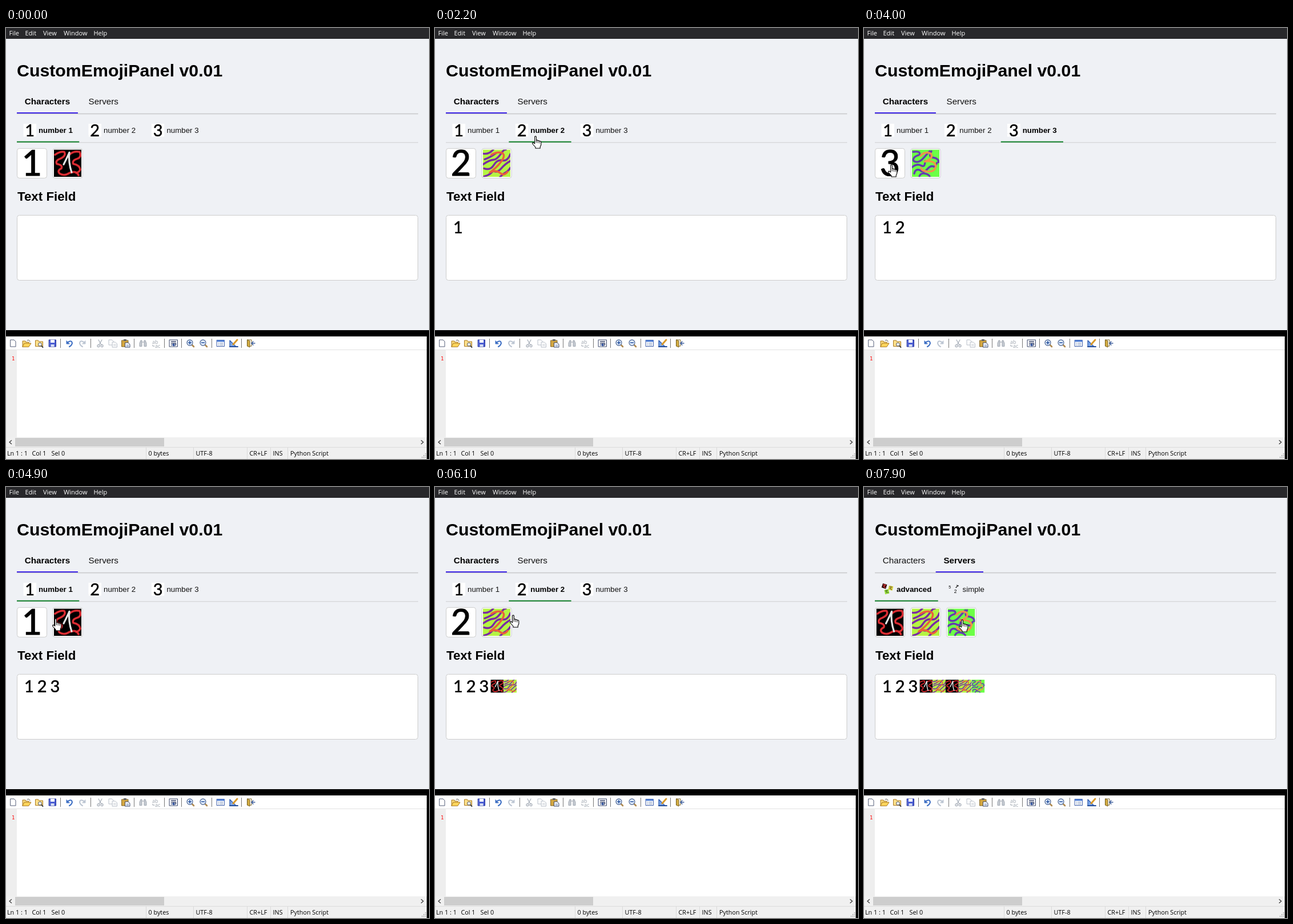
An HTML page for the animation above (8 s loop, 741x756 px).

```html
<!DOCTYPE html>
<html lang="en">
<head>
<meta charset="utf-8">
<title>Emoji panel</title>
<style>
html, body { margin: 0; width: 100%; height: 100%; overflow: hidden; background: #000; }
svg { display: block; width: 741px; height: 756px; }
text { white-space: pre; }
.page { font-family: "Liberation Sans", Arial, sans-serif; }
.ui { font-family: "Open Sans", "Noto Sans", sans-serif; }
.digit { font: 61px Lato, sans-serif; text-anchor: middle; stroke: #000; stroke-width: 1.1; }
.line { fill: none; stroke-linecap: round; stroke-linejoin: round; }
</style>
</head>
<body>
<svg id="stage" viewBox="0 0 741 756" xmlns="http://www.w3.org/2000/svg"></svg>
<script>
const LOOP = 8000, STEP = 100, LEFT = 19, SLOT = 22.8, GAP = 4.8;
const stage = document.getElementById('stage');
const measureCtx = document.createElement('canvas').getContext('2d');

const rect = (x, y, w, h, fill, more = '') =>
  `<rect x="${x}" y="${y}" width="${w}" height="${h}" fill="${fill}" ${more}/>`;
const text = (x, y, size, str, more = '') =>
  `<text x="${x}" y="${y}" font-size="${size}" ${more}>${str}</text>`;
const path = (d, stroke, width = 1, fill = 'none') =>
  `<path d="${d}" class="line" style="fill:${fill}" stroke="${stroke}" stroke-width="${width}"/>`;
const tile = (id, x, y, size) =>
  `<use href="#${id}" transform="translate(${x} ${y}) scale(${size / 48})"/>`;
const textWidth = (str, size, bold) => {
  measureCtx.font = `${bold ? 'bold ' : ''}${size}px "Liberation Sans", Arial, sans-serif`;
  return measureCtx.measureText(str).width;
};

// Emoji artwork, each on a 48 unit square
const symbol = (id, body) =>
  `<symbol id="${id}" width="48" height="48" viewBox="0 0 48 48">${body}</symbol>`;
const digit = n =>
  symbol('d' + n, rect(0, 0, 48, 48, '#fff') + `<text class="digit" x="24" y="46">${n}</text>`);

const redLoops = 'M2 9Q10 3 18 4Q22 11 11 16Q2 19 5 25Q16 27 13 33Q5 37 10 42Q18 47 27 41Q40 36 43 45' +
  'M28 8Q35 2 45 4Q49 13 41 16Q31 19 34 25Q45 27 46 35Q45 39 39 41';
const purpleWaves = 'M0 7Q10 9 18 0M0 26Q12 18 18 18T31 8T40 0M2 33Q13 37 19 27T34 19T48 8' +
  'M2 47Q12 45 18 37Q24 42 32 33T48 20M30 48Q36 42 40 40T48 32M3 17Q12 14 23 6';
const purpleLoops = 'M2 4Q16 2 13 9Q0 13 3 20Q11 25 20 15T31 3M34 3Q28 13 37 14T47 22' +
  'M0 31Q9 24 16 28T23 20M4 42Q6 33 14 36Q20 42 27 34T40 31L44 23M13 47Q15 41 22 42T31 47';
const artwork =
  symbol('e1', rect(0, 0, 48, 48, '#000') + path(redLoops, '#b61f25', 3.8) +
    path(redLoops, '#e8343a', 1.6) + path('M17 26Q23 14 27 5Q25 22 31 40', '#e4e4e4', 3.2)) +
  symbol('e2', rect(0, 0, 48, 48, '#b5f443') + path(purpleWaves, '#7a2aa5', 3.4) +
    path('M15 9Q25 3 34 6Q40 10 32 21T12 40Q23 35 30 41T43 39', '#ea5f3a', 3.4)) +
  symbol('e3', rect(0, 0, 48, 48, '#6cff46') + path(purpleLoops, '#653bb0', 3.4) +
    path('M15 11Q23 2 33 7Q39 15 22 21Q40 18 42 29Q39 41 25 38Q17 37 16 32', '#f0924a', 3.4)) +
  symbol('advanced',
    `<g transform="translate(3 4) rotate(18 8 8) scale(.34)">${tileBody('#2a0808', '#c33')}</g>` +
    `<g transform="translate(29 10) rotate(14) scale(.33)">${tileBody('#d6d640', '#8b7530')}</g>` +
    `<g transform="translate(11 27) rotate(-12) scale(.33)">${tileBody('#9be03c', '#59862b')}</g>`) +
  symbol('simple', `<g class="page">${text(5, 22, 15, '5')}${text(25, 38, 18, '2')}</g>` +
    path('M32 18L40 10M35 9L41 12', '#222', 2.6));

function tileBody(fill, mark) {
  return rect(0, 0, 48, 48, fill) + path('M8 12L34 8L16 28L38 38', mark, 9);
}

// Toolbar icons, centred on their own origin
const sheet = (x, y, w, h, stroke) =>
  path(`M${x} ${y}h${w - 3}l3 3v${h - 3}h${-w}z`, stroke, 1, '#fff');
const folder = path('M-7 6V-4H-2L-1 -2H4V0', '#a87820', 1, '#f8d878') +
  path('M-7 6L-4 0H8L4 6Z', '#a87820', 1, '#ffd65c');
const lens = mark => path('M2 2L6 6', '#b08a50', 2.6) +
  `<circle cx="-1" cy="-1" r="5" fill="#e4efff" stroke="#58709c" stroke-width="1.3"/>` + path(mark, '#234f9c', 1.6);
const turn = (stroke, flip) => `<g transform="scale(${flip} 1)">` +
  path('M-4 -1Q4 -7 5 0Q4 4 0 6', stroke, 2) + path('M-5 -4V1H0Z', stroke, 1, stroke) + '</g>';
const ICONS = [
  [12.5, sheet(-4.5, -6, 9, 12, '#555f78')],
  [36, folder + path('M1 -5Q5 -7 6 -3', '#555', 1)],
  [58.5, path('M-7 5V-5H-2L-1 -3H6V5Z', '#a87820', 1, '#ffe08a') + path('M3 4L6 7', '#444', 2) +
    '<circle cx="1" cy="2" r="3" fill="#eef6ff" stroke="#555"/>'],
  [81.5, path('M-6 -6H6V6H-6Z', '#27349b', 1, '#4a5dd2') + rect(-3.5, -6, 7, 5, '#fff') + rect(-3, 2, 6, 4, '#d5dcf5')],
  [111, turn('#3f70c4', 1)],
  [134, turn('#bdc6d3', -1)],
  [165, path('M-3 -6L2 3M3 -6L-2 3', '#a9b0ba', 1.3) +
    '<g fill="none" stroke="#a9b0ba" stroke-width="1.3"><circle cx="-3" cy="4.5" r="2"/><circle cx="3" cy="4.5" r="2"/></g>'],
  [187.5, sheet(-7, -6, 8, 9, '#b8bec8') + sheet(-1, -2, 8, 9, '#b8bec8') + path('M1 2h4M1 4h4', '#c8cdd4')],
  [210, path('M-7 -5H4V6H-7Z', '#80662a', 1, '#d3a640') + rect(-4, -7, 5, 3, '#666') + sheet(-1, -1, 8, 8, '#39466b') +
    path('M1 3h4M1 5h4', '#7189b5')],
  [240, path('M-6 5V0L-4 -5H-2V5ZM6 5V0L4 -5H2V5ZM-2 -2H2', '#a0a7b1', 1, '#c6cbd2')],
  [263, `<g class="ui" fill="#9da4ad">${text(-7, 1, 9, 'ab')}${text(-2, 8, 9, 'ac')}</g>` + path('M-6 3V5H-3', '#9da4ad')],
  [293.5, path('M-7 -6H7V6H-7Z', '#39466b', 1, '#fff') + path('M-4 -3H4M-4 0H4V3H-1M-4 3H-3', '#39466b', 1.3) +
    path('M1 1V5L-2 3Z', '#274b9c', 1, '#274b9c')],
  [323, lens('M-3.5 -1H1.5M-1 -3.5V1.5')],
  [346, lens('M-3.5 -1H1.5')],
  [376, path('M-6.5 -5.5H6.5V5.5H-6.5Z', '#3d5da8', 1, '#fff') + rect(-6.5, -5.5, 13, 3, '#4f7fd6') +
    path('M-4 0H-3M-1 0H4M-4 3H-3M-1 3H4', '#6680ae', 1.2)],
  [399, path('M-7 -5L4 6H-7Z', '#2a58ad', 1.2, '#7da7e8') + path('M6 -6L-1 2', '#d99a2b', 3) + path('M-7 6H7', '#264f9c', 2)],
  [429, path('M-6 -6H1V5H-6Z', '#7c6422', 1, '#fff') + path('M-6 -6L-2 -4V7L-6 5Z', '#7c6422', 1, '#d5ae43') +
    path('M7 0H1M4 -3L1 0L4 3', '#3e5f9e', 1.5)]
];

function staticScene() {
  const label = (y, size, items) => items.map(([x, s]) => text(x, y, size, s)).join('');
  const separators = [95.5, 148.5, 224.5, 277.5, 307.5, 360.5, 412.5].map(x => rect(x - .5, 545, 1, 16, '#777')).join('');
  const dividers = [245, 328, 422, 463, 493].map(x => rect(x, 736, 1, 20, '#dadada')).join('');
  let grip = '';
  for (let i = 0; i < 3; i++)
    for (let j = 0; j <= i; j++) grip += rect(734 - 3 * j, 746 + 3 * i, 2, 2, '#bdbdbd');
  return rect(0, 0, 741, 756, '#000') + rect(0, 0, 741, 530, '#eff1f5') + rect(0, 0, 741, 19, '#28282b') +
    `<g class="ui" fill="#fff">${label(13, 11,
      [[5.5, 'File'], [33.5, 'Edit'], [65, 'View'], [101, 'Window'], [153.5, 'Help']])}</g>` +
    `<g class="page" font-weight="bold">${text(19, 85, 30.3, 'CustomEmojiPanel v0.01')}${text(20, 303.3, 22.3, 'Text Field')}</g>` +
    rect(LEFT, 149.7, 703, 1.6, '#c9c9cc') + rect(LEFT, 200.4, 703, 1, '#ccccd0') +
    rect(19.5, 328.5, 702, 114, '#fff', 'rx="4" stroke="#ccc"') +
    rect(0, 541, 737, 215, '#fff') + rect(0, 564, 737, 1, '#e2e2e2') + rect(0, 565, 19, 153, '#eee') +
    separators + ICONS.map(([x, art]) => `<g transform="translate(${x} 553)">${art}</g>`).join('') +
    text(10, 583, 8.8, '1', 'fill="#f00" font-family="DejaVu Sans Mono, monospace"') +
    rect(0, 718, 737, 17, '#f0f0f0') + rect(16, 719, 261, 15, '#cdcdcd') +
    path('M9.5 723.5L6 726.5L9.5 729.5M727.5 723.5L731 726.5L727.5 729.5', '#444', 1.5) +
    rect(0, 735, 737, 21, '#f0f0f0') + rect(0, 735, 737, 1, '#dcdcdc') + dividers + grip +
    `<g class="ui">${label(750, 10.8, [[2, 'Ln 1 : 1'], [45.5, 'Col 1'], [79.5, 'Sel 0'], [249.5, '0 bytes'],
      [332.5, 'UTF-8'], [426.5, 'CR+LF'], [467.5, 'INS'], [498, 'Python Script']])}</g>`;
}

// Each view: top tab, sub tabs, active sub tab, emojis on offer
const characters = n => ({
  top: 0, active: n - 1, emojis: ['d' + n, 'e' + n],
  tabs: [1, 2, 3].map(i => ['number ' + i, 'd' + i])
});
const servers = {
  top: 1, active: 0, emojis: ['e1', 'e2', 'e3'],
  tabs: [['advanced', 'advanced'], ['simple', 'simple']]
};
const VIEWS = [[0, characters(1)], [2100, characters(2)], [3500, characters(3)],
  [4700, characters(1)], [5500, characters(2)], [6700, servers]];
const ENTRIES = [[1700, 'd1'], [2700, 'd2'], [4200, 'd3'], [5100, 'e1'],
  [6000, 'e2'], [7200, 'e1'], [7600, 'e2'], [7900, 'e3']];
const POINTER = [[1200, 420, 520], [1600, 50, 238], [1800, 50, 238], [2100, 176, 190], [2200, 176, 190],
  [2500, 50, 235], [2800, 50, 235], [3100, 219.5, 240], [3400, 300, 183], [3700, 300, 183],
  [4000, 48, 240], [4300, 48, 240], [4700, 80, 182], [4900, 87, 231], [5000, 108, 238],
  [5200, 108, 238], [5500, 185, 180], [5600, 185, 180], [5900, 110, 235], [6000, 110, 235],
  [6100, 137, 225], [6600, 171, 131], [6800, 171, 131], [7000, 88, 227], [7100, 48, 235],
  [7300, 48, 235], [7500, 104, 236], [7700, 104, 236], [7900, 172, 233]];

function tabRow(tabs, active, { size, baseline, lead, tail, lineY, color, icons }) {
  let x = LEFT, out = '';
  tabs.forEach(([name, icon], i) => {
    const on = i === active, width = lead + textWidth(name, size, on) + tail;
    if (icons) out += tile(icon, x + 11.3, 168, SLOT);
    out += text(x + lead, baseline, size, name, on ? 'font-weight="bold"' : 'fill="#111"');
    if (on) out += rect(x, lineY, width, 2, color);
    x += width + GAP;
  });
  return `<g class="page">${out}</g>`;
}

const emojiButton = (id, i) => {
  const x = LEFT + 62.5 * i;
  return rect(x + .5, 211.3, 52, 52, '#fff', 'rx="4" stroke="#ccc"') + tile(id, x + 2.5, 213.3, 48);
};

function pointerAt(t) {
  const next = POINTER.findIndex(p => p[0] >= t);
  const b = POINTER[next], a = POINTER[Math.max(0, next - 1)];
  const k = a === b ? 0 : (t - a[0]) / (b[0] - a[0]);
  return [a[1] + (b[1] - a[1]) * k, a[2] + (b[2] - a[2]) * k];
}

const HAND = 'M-1.3 13V1.2a1.35 1.35 0 0 1 2.7 0V7q2.2-1.2 2.8.8q2.2-1 2.8.8q2.6-.6 2.8 1.6V15l-1.6 3.5V21H0V19L-5 13.5q-1-2.2 1-2.4q1.3.2 2.7 1.9Z';
const ARROW = 'M0 0V15.5L3.6 12.2L6.2 18.2L8.8 17.1L6.3 11.3H11Z';

function pointer(t, view) {
  if (t < POINTER[0][0]) return '';
  const [x, y] = pointerAt(t);
  const over = (l, r, top, bottom) => x >= l && x <= r && y >= top && y <= bottom;
  const hand = over(19, 210, 113, 150) || over(19, 348, 155, 202) ||
    view.emojis.some((_, i) => over(18 + 62.5 * i, 75 + 62.5 * i, 211, 264));
  const art = hand
    ? path(HAND, '#000', 1.1, '#fff') + path('M1.4 7V11M4.2 8V11.5M7 9V12', '#000', .9)
    : path(ARROW, '#000', 1, '#fff');
  return `<g transform="translate(${x} ${y})">${art}</g>`;
}

function render(t) {
  const view = VIEWS.filter(v => v[0] <= t).pop()[1];
  return tabRow([['Characters'], ['Servers']], view.top,
      { size: 15.2, baseline: 134, lead: 13.8, tail: 13.8, lineY: 148, color: '#3b22e6' }) +
    tabRow(view.tabs, view.active,
      { size: 13.3, baseline: 184.3, lead: 38, tail: 11.4, lineY: 198.7, color: '#12812b', icons: true }) +
    view.emojis.map(emojiButton).join('') +
    ENTRIES.filter(e => e[0] <= t).map((e, i) => tile(e[1], 29 + SLOT * i, 338, SLOT)).join('') +
    pointer(t, view);
}

stage.innerHTML = `<defs>${[1, 2, 3].map(digit).join('')}${artwork}</defs>${staticScene()}<g id="live"></g>`;
const live = document.getElementById('live');
const start = performance.now();
let shown = -1;

function tick(now) {
  const t = Math.floor(Math.max(0, now - start) % LOOP / STEP) * STEP;
  if (t !== shown) live.innerHTML = render(shown = t);
  requestAnimationFrame(tick);
}
tick(start);
</script>
</body>
</html>
```
